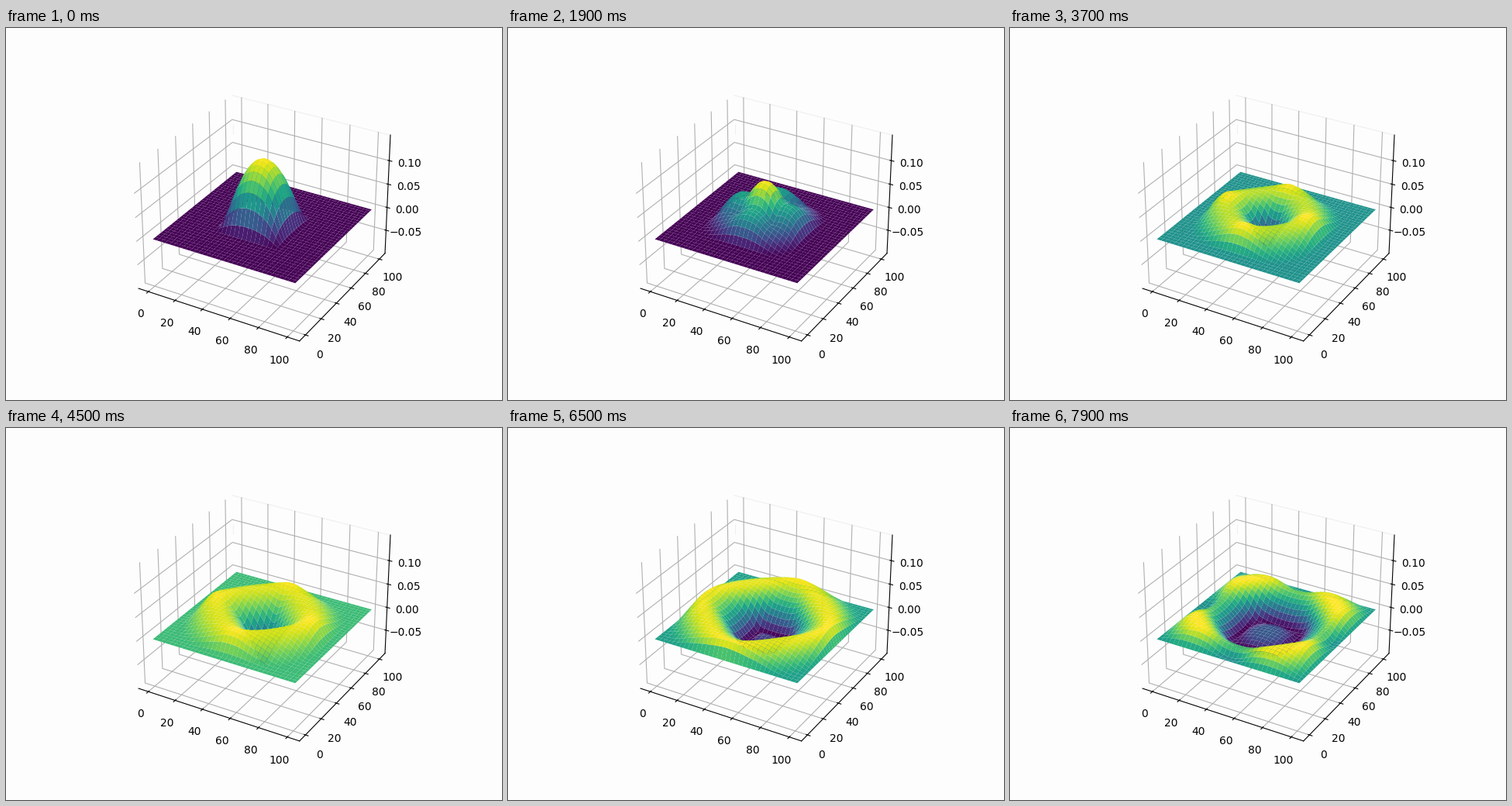
A matplotlib script for the animation above (8 s loop, 640 by 480 pixels).

```python
import numpy as np
import matplotlib.pyplot as plt
from matplotlib.animation import FuncAnimation
from matplotlib.lines import Line2D

FRAMES, INTERVAL = 80, 100
SIDE = 101            # membrane spans 0..SIDE, grid spacing 1
CENTRE, REACH = 50, 25
COURANT2 = 0.25       # (c dt / dx) ** 2
PAPER = "#fdfdfd"


def bump(x):
    """Smooth bump that vanishes beyond REACH from the centre."""
    a = (x - CENTRE) / REACH
    inside = np.abs(a) < 1
    return np.where(inside, np.exp(-1 / np.where(inside, 1 - a**2, 1)), 0)


def laplacian(u):
    out = np.zeros_like(u)
    out[1:-1, 1:-1] = (u[2:, 1:-1] + u[:-2, 1:-1] + u[1:-1, 2:]
                       + u[1:-1, :-2] - 4 * u[1:-1, 1:-1])
    return out


def solve(u, count):
    """Leapfrog wave equation with a clamped rim, starting at rest."""
    prev, cur = u, u + 0.5 * COURANT2 * laplacian(u)
    states = []
    for _ in range(count):
        states.append(cur)
        prev, cur = cur, 2 * cur - prev + COURANT2 * laplacian(cur)
    return states


def padded(lo, hi):
    pad = (hi - lo) / 48
    return lo - pad, hi + pad


side = np.arange(SIDE + 1.0)
X, Y = np.meshgrid(side, side)
waves = solve(bump(X) * bump(Y), FRAMES)

fig = plt.figure(figsize=(6.4, 4.8), dpi=100, facecolor=PAPER)
ax = fig.add_subplot(projection="3d")
ax.set_facecolor("none")
ax.set_xlim(*padded(-0.05 * SIDE, 1.05 * SIDE))
ax.set_ylim(*padded(-0.05 * SIDE, 1.05 * SIDE))
ax.set_zlim(*padded(-0.0963, 0.1482))
ax.set_xticks(range(0, 101, 20))
ax.set_yticks(range(0, 101, 20))
ax.set_zticks([-0.05, 0, 0.05, 0.10])
for axis in (ax.xaxis, ax.yaxis, ax.zaxis):
    axis.set_pane_color((1, 1, 1, 0))

# faint rim of the back wall
for xs, ys in (((292, 495), (87, 138)), ((292.5, 292.5), (125, 136))):
    fig.add_artist(Line2D(np.array(xs) / 640, 1 - np.array(ys) / 480,
                          color="#efefef", lw=0.8, zorder=-1))

shown = []


def draw(n):
    while shown:
        shown.pop().remove()
    shown.append(ax.plot_surface(X, Y, waves[n], cmap="viridis"))
    return shown


anim = FuncAnimation(fig, draw, frames=FRAMES, interval=INTERVAL,
                     repeat=True, repeat_delay=0, blit=False)
plt.show()
```
